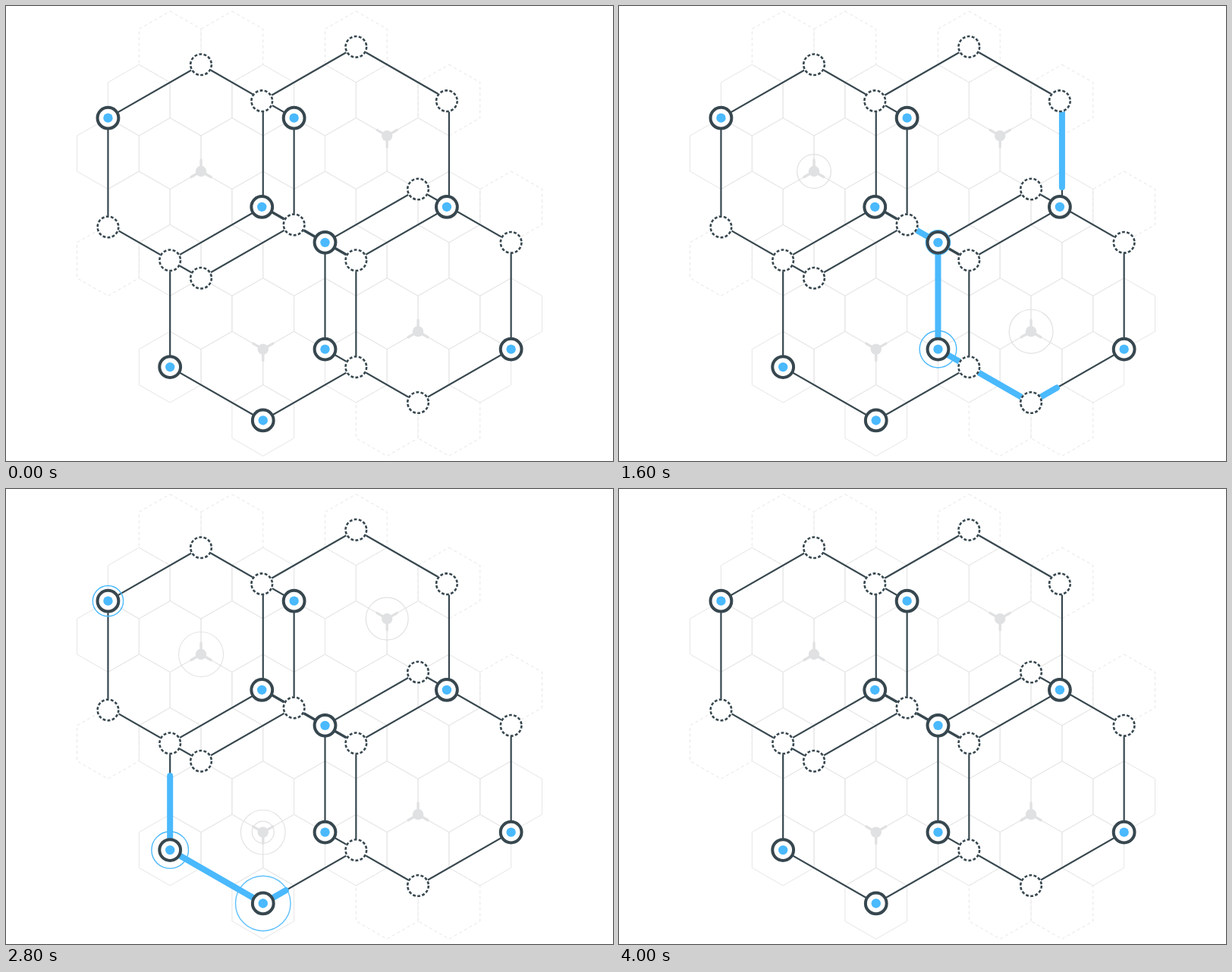
Animation, 800 px wide and 600 px high, one loop 4.3 s. Source, as an HTML page with a canvas:

```html
<!DOCTYPE html>
<html lang="en">
<head>
<meta charset="utf-8">
<title>Hexagon network</title>
<style>
  html, body { margin: 0; width: 100%; height: 100%; overflow: hidden; background: #fff; }
  canvas { display: block; width: 800px; height: 600px; }
</style>
</head>
<body>
<canvas id="stage"></canvas>
<script>
const LOOP = 4300;
const DARK = '#37474f', BLUE = '#4ab9fd', GRID = '#e6e6e6', GREY = '#e0e1e2';

const canvas = document.getElementById('stage');
const scale = Math.max(1, window.devicePixelRatio || 1);
canvas.width = 800 * scale;
canvas.height = 600 * scale;
const ctx = canvas.getContext('2d');

// Everything sits on one lattice: half a cell wide, half a cell side high.
const place = (col, row) => [93.6 + 40.86 * col, 53.8 + 23.46 * row];

const bigHexes = [[4, 7], [9, 6], [6, 15], [11, 14]];
const dashedCells = [[3, 0], [5, 0], [9, 0], [12, 3], [14, 9], [1, 12], [10, 21], [12, 21]];

// Hubs: column, row, time when the ring comes clear of the hub.
const hubs = [[1, 4, 2800], [7, 4], [6, 9, 1800], [12, 9, 1800], [8, 11, 1700],
  [8, 17, 1500], [14, 17, 600], [3, 18, 2700], [6, 21, 2400]];
const isHub = (col, row) => hubs.some(h => h[0] === col && h[1] === row);

// Nodes that sit a little off their corner.
const nudges = { '12,3': [-3, 1], '12,9': [-3, 0], '6,3': [-1.5, 1], '6,9': [-1.5, 0], '1,10': [0, 3] };

const tripods = [
  { at: [4, 7], dir: -1, start: 1100 },
  { at: [10, 5], dir: 1, start: 2000 },
  { at: [6, 17], dir: 1, start: 1830 },
  { at: [11, 16], dir: -1, start: 0 }
];

// Each end of a pulse eases along the route between two times.
const pulses = [
  {
    route: [[14, 17], [11, 20], [8, 17], [8, 11], [6, 9], [6, 3], [4, 1], [1, 4]],
    head: [435, 2685], tail: [1255, 2845]
  },
  {
    route: [[12, 3], [12, 9], [9, 12], [9, 18], [6, 21], [3, 18], [3, 12], [1, 10]],
    head: [1070, 3400], tail: [2000, 3510]
  }
];

const clamp = v => Math.min(1, Math.max(0, v));
const smooth = p => p * p * (3 - 2 * p);

// Symmetric cubic-bezier(.65, .25, .35, .75), solved by halving.
function ease(p) {
  const curve = (a, s) => 3 * (1 - s) * s * (a * (1 - s) + (1 - a) * s) + s * s * s;
  let low = 0, high = 1;
  for (let i = 0; i < 24; i++) {
    const mid = (low + high) / 2;
    if (curve(0.65, mid) < p) low = mid; else high = mid;
  }
  return curve(0.25, low);
}

const progress = ([from, to], t) => ease(clamp((t - from) / (to - from)));

// Corners of a hexagon on the lattice; size 1 is a grid cell, 3 a big one.
function corners(col, row, size) {
  return [[0, -2], [1, -1], [1, 1], [0, 2], [-1, 1], [-1, -1]]
    .map(([x, y]) => [col + x * size, row + y * size]);
}

const nodes = new Map();
bigHexes.forEach(([col, row]) => corners(col, row, 3).forEach(c => nodes.set(String(c), c)));

function nodePlace(col, row) {
  const [x, y] = place(col, row);
  const [dx, dy] = nudges[[col, row]] || [0, 0];
  return [x + dx, y + dy];
}

// A grid cell is solid inside a big hexagon; on a corner only where a hub sits.
function isSolid(col, row) {
  return isHub(col, row) || bigHexes.some(([c, r]) => {
    const dx = Math.abs(col - c), dy = Math.abs(row - r);
    const onCorner = (dx === 3 && dy === 3) || dy === 6;
    return dx <= 3 && dx + dy <= 6 && !onCorner;
  });
}

const solidCells = [];
for (let row = 0; row <= 21; row += 3) {
  for (let col = 1 + (row + 1) % 2 * 0; col <= 14; col++) {
    if ((col + row) % 2 === 1 && isSolid(col, row)) solidCells.push([col, row]);
  }
}

function pen(color, width, dash = []) {
  ctx.strokeStyle = color;
  ctx.lineWidth = width;
  ctx.setLineDash(dash);
}

function hexPath(col, row, size) {
  corners(col, row, size).forEach((c, i) => ctx[i ? 'lineTo' : 'moveTo'](...place(...c)));
  ctx.closePath();
}

function strokeHexes(list, size) {
  ctx.beginPath();
  list.forEach(([col, row]) => hexPath(col, row, size));
  ctx.stroke();
}

function ring(x, y, r) {
  ctx.beginPath();
  ctx.arc(x, y, r, 0, 2 * Math.PI);
  ctx.stroke();
}

function disc(x, y, r, color) {
  ctx.beginPath();
  ctx.arc(x, y, r, 0, 2 * Math.PI);
  ctx.fillStyle = color;
  ctx.fill();
}

function drawGrid() {
  pen(GRID, 1, [4, 3.6]);
  strokeHexes(dashedCells, 1);
  pen(GRID, 1);
  strokeHexes(solidCells, 1);
}

function drawRipple(x, y, age) {
  if (age <= 0 || age >= 1310) return;
  ctx.globalAlpha = clamp((1320 - age) / 370);
  pen(GREY, 1.2);
  ring(x, y, 30 * (1 - Math.pow(1 - age / 1310, 2.85)));
  ctx.globalAlpha = 1;
}

function drawTripod({ at, dir, start }, t) {
  const [x, y] = place(...at);
  if (t > 0) {
    drawRipple(x, y, t - start);
    drawRipple(x, y, t - start - 700);
  }
  pen(GREY, 3.4);
  ctx.lineCap = 'round';
  ctx.beginPath();
  for (const turn of [0, 120, 240]) {
    const a = (dir * 90 + turn) * Math.PI / 180;
    ctx.moveTo(x, y);
    ctx.lineTo(x + 15 * Math.cos(a), y + 15 * Math.sin(a));
  }
  ctx.stroke();
  ctx.lineCap = 'butt';
  disc(x, y, 7.2, GREY);
}

function drawLines() {
  pen(DARK, 2.2);
  strokeHexes(bigHexes, 3);
  // Shared edge
  pen(DARK, 3.4);
  ctx.beginPath();
  ctx.moveTo(...place(6, 9));
  ctx.lineTo(...place(9, 12));
  ctx.stroke();
}

function drawHubRing([col, row, time], t) {
  const age = t - time;
  if (!time || age < -200 || age >= 960) return;
  ctx.globalAlpha = clamp((970 - age) / 650);
  pen(BLUE, 1.4);
  ring(...nodePlace(col, row), 47.4 * smooth(clamp((age + 765) / 1700)));
  ctx.globalAlpha = 1;
}

function drawPulse({ route, head, tail }, t) {
  const points = route.map(c => place(...c));
  const total = points.slice(1).reduce(
    (sum, [x, y], i) => sum + Math.hypot(x - points[i][0], y - points[i][1]), 0);
  const from = total * progress(tail, t);
  const length = total * progress(head, t) - from;
  if (length < 0.5) return;
  pen(BLUE, 8, [length, 2 * total]);
  ctx.lineDashOffset = -from;
  ctx.lineCap = ctx.lineJoin = 'round';
  ctx.beginPath();
  points.forEach(p => ctx.lineTo(...p));
  ctx.stroke();
  ctx.lineDashOffset = 0;
  ctx.lineCap = 'butt';
  ctx.lineJoin = 'miter';
}

function drawNode(col, row) {
  const [x, y] = nodePlace(col, row);
  disc(x, y, 15, '#fff');
  if (isHub(col, row)) {
    pen(DARK, 4);
    ring(x, y, 13.9);
    disc(x, y, 6.2, BLUE);
  } else {
    const period = 2 * Math.PI * 13.8 / 14;
    pen(DARK, 2.6, [period * 0.62, period * 0.38]);
    ring(x, y, 13.8);
  }
}

function draw(t) {
  ctx.setTransform(scale, 0, 0, scale, 0, 0);
  ctx.fillStyle = '#fff';
  ctx.fillRect(0, 0, 800, 600);
  drawGrid();
  tripods.forEach(tripod => drawTripod(tripod, t));
  drawLines();
  hubs.forEach(hub => drawHubRing(hub, t));
  pulses.forEach(pulse => drawPulse(pulse, t));
  nodes.forEach(([col, row]) => drawNode(col, row));
}

// The picture moves in steps of 100 ms and rests around the loop point.
function stepTime(ms) {
  const t = Math.floor(ms / 100) * 100;
  if (t < 400) return 0;
  if (t >= 4000) return 4000;
  return Math.min(t, 3800);
}

const begin = performance.now();
function tick() {
  draw(stepTime((performance.now() - begin) % LOOP));
  requestAnimationFrame(tick);
}
tick();
</script>
</body>
</html>
```
